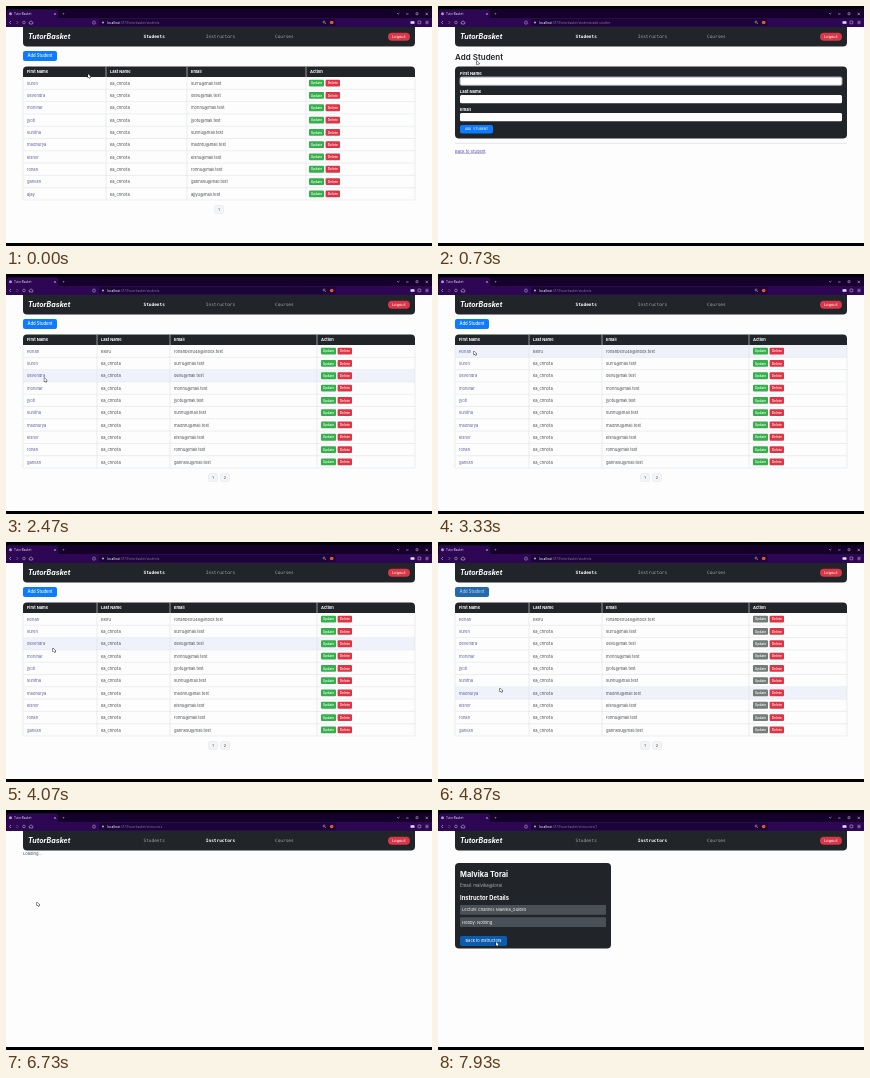
Animation of 426 by 240 pixels, one loop 8000 ms. Source, as an HTML page with a canvas:

```html
<!DOCTYPE html>
<html lang="en">
<head>
<meta charset="utf-8">
<title>Student admin</title>
<style>
html, body { margin: 0; width: 100%; height: 100%; overflow: hidden; background: #000; }
canvas { display: block; width: 426px; height: 240px; }
</style>
</head>
<body>
<canvas id="stage" width="426" height="240"></canvas>
<script>
const ctx = document.getElementById('stage').getContext('2d');
const LOOP = 8000;
const SANS = 'Inter, sans-serif', MONO = '"DejaVu Sans Mono", monospace';
const DARK = '#212529', BLUE = '#0d7bfd', RED = '#dc3545', GREEN = '#34b04a', LINE = '#dfe2e6';
const BRAND = 'TutorBasket';

const LAST = 'ka_chhota';
const people = [
  ['suren', 'surru'], ['devendra', 'devu'], ['mohinar', 'mohnu'], ['jyoti', 'jyotu'],
  ['sunitha', 'sunnu'], ['madhurya', 'madhru'], ['kishor', 'kishu'], ['rohan', 'rohnu'],
  ['ganesh', 'gannesu'], ['ajay', 'ajjyu']
].map(([name, mail]) => [name, LAST, mail + '@mail.test']);
const newcomer = ['Rohan', 'Belru', 'rohanbelru48@inbox.test'];

// Views in order: start time, kind
const views = [
  [0, 'list'], [600, 'form'], [2000, 'added'], [5980, 'list'], [6400, 'loading'], [6950, 'details']
];
// Pointer stops: time, x, y
const pointer = [
  [0, 82, 68], [350, 34, 50], [650, 34, 50], [950, 60, 76], [1200, 72, 88], [1530, 90, 104.5],
  [1750, 40, 123], [2050, 40, 123], [3000, 36, 77], [3560, 36, 77], [4700, 62, 146],
  [5000, 62, 146], [5550, 336, 77], [6000, 336, 77], [6300, 214, 30], [6420, 214, 30],
  [6720, 31, 92], [7000, 31, 92], [7700, 58, 132], [8000, 58, 132]
];

function rect(x, y, w, h, color, radius = 0) {
  ctx.fillStyle = color;
  ctx.beginPath();
  ctx.roundRect(x, y, w, h, radius);
  ctx.fill();
}

function outline(x, y, w, h, color, radius = 0, width = 0.5) {
  ctx.strokeStyle = color;
  ctx.lineWidth = width;
  ctx.beginPath();
  ctx.roundRect(x, y, w, h, radius);
  ctx.stroke();
}

function path(color, width, ...points) {
  ctx.strokeStyle = color;
  ctx.lineWidth = width;
  ctx.beginPath();
  points.forEach(([x, y], i) => i ? ctx.lineTo(x, y) : ctx.moveTo(x, y));
  ctx.stroke();
}

function dot(x, y, r, color) {
  ctx.fillStyle = color;
  ctx.beginPath();
  ctx.arc(x, y, r, 0, 2 * Math.PI);
  ctx.fill();
}

// Text is centred vertically on y
function text(str, x, y, size, color, { weight = 400, font = SANS, align = 'left' } = {}) {
  ctx.font = `${weight} ${size}px ${font}`;
  ctx.textAlign = align;
  ctx.textBaseline = 'alphabetic';
  ctx.fillStyle = color;
  ctx.fillText(str, x, y + size * 0.35);
  return ctx.measureText(str).width;
}

function button(label, x, y, w, h, color, size, { ink = '#fff', radius = 2, font = SANS, weight = 500 } = {}) {
  rect(x, y, w, h, color, radius);
  text(label, x + w / 2, y + h / 2, size, ink, { align: 'center', font, weight });
}

function pointerAt(t) {
  const i = pointer.findIndex(stop => stop[0] > t);
  const [t0, x0, y0] = pointer[i - 1], [t1, x1, y1] = pointer[i];
  const p = (t - t0) / (t1 - t0), k = p * p * (3 - 2 * p);
  return [x0 + (x1 - x0) * k, y0 + (y1 - y0) * k];
}

const inside = ([px, py], x, y, w, h) => px >= x && px < x + w && py >= y && py < y + h;

function drawBrowser(route) {
  rect(0, 0, 426, 240, '#000');
  rect(0, 3, 426, 9, '#14002a');
  rect(1, 3.5, 51, 9, '#2d0754', [2, 2, 0, 0]);
  rect(0, 12, 426, 9, '#2d0754');
  dot(4.5, 7.8, 1.5, '#a997c8');
  text(BRAND, 8, 7.8, 3.1, '#ded5ea');
  text('×', 47.5, 7.7, 4.5, '#ded5ea');
  text('+', 56, 7.7, 4.5, '#b9a9cf');

  const ink = '#c9bddb';
  path(ink, 0.6, [391, 7], [392.2, 8.2], [393.4, 7]);
  path(ink, 0.6, [400, 8], [402.5, 8]);
  outline(410, 6.7, 2, 2, ink);
  path(ink, 0.6, [419.5, 6.7], [422, 9.2]);
  path(ink, 0.6, [422, 6.7], [419.5, 9.2]);

  path(ink, 0.6, [5, 15], [3.5, 16.5], [5, 18]);
  path('#8f7aa9', 0.6, [10.5, 15], [12, 16.5], [10.5, 18]);
  outline(16.7, 15.2, 2.6, 2.6, ink, 1.3);
  path(ink, 0.6, [23, 16.5], [25, 14.8], [27, 16.5], [26.5, 18], [23.5, 18], [23, 16.5]);
  outline(86.8, 15.2, 2.4, 2.8, ink, 0.4);
  rect(93, 13, 237, 7, '#1b0438', 2);
  dot(97, 16.5, 0.9, ink);
  const host = text('localhost', 101, 16.5, 3.1, '#fff');
  text(':5173/tutorbasket/' + route, 101 + host, 16.5, 3.1, '#8975a3');
  outline(317, 15, 2, 2, ink, 1);
  path(ink, 0.5, [319, 17], [320, 18]);
  dot(325.7, 16.5, 1.8, '#f0522c');
  rect(404.5, 15.2, 4, 2.6, '#e9e2f1', 0.5);
  outline(412, 15, 2.8, 2.8, ink);
  for (const y of [15.3, 16.5, 17.7]) path(ink, 0.5, [419.5, y], [422.5, y]);

  rect(0, 21, 426, 216, '#fdfdfd');
}

function drawNav(active) {
  rect(17, 21, 392, 19.5, DARK, [0, 0, 4, 4]);
  text(BRAND, 22, 30.8, 7.1, '#fff', { weight: 'italic 700' });
  [['Students', 137.5], ['Instructors', 199.8], ['Courses', 269]].forEach(([label, x]) => {
    const on = label === active;
    text(label, x, 30.7, 4.45, on ? '#fff' : '#a2a6aa', { font: MONO, weight: on ? 700 : 400 });
  });
  button('Logout', 382, 26.7, 22, 8, RED, 3.9, { radius: 4, font: MONO });
}

function drawTable(added, mouse, settling) {
  const rows = added ? [newcomer, ...people.slice(0, 9)] : people;
  const cols = added ? [17, 91, 164, 311, 409] : [17, 100, 181, 300, 409];
  const top = 71, step = 12.3, bottom = top + 10 * step;
  const addHover = settling || inside(mouse, 17, 45, 34, 10);
  button('Add Student', 17, 45, 34, 10, addHover ? '#2468ad' : BLUE, 4.2, { ink: settling ? '#b7cce4' : '#fff' });

  rect(17, 60.5, 392, 10.5, DARK, [4, 4, 0, 0]);
  ['First Name', 'Last Name', 'Email', 'Action'].forEach((label, i) =>
    text(label, cols[i] + 4, 66, 4, '#fff', { weight: 700 }));

  rows.forEach((row, i) => {
    const y = top + i * step, mid = y + step / 2;
    if (inside(mouse, 17, y, 392, step)) rect(17, y, 392, step, '#f0f2fb');
    row.forEach((value, c) => text(value, cols[c] + 4, mid + 0.3, 4.1, c ? '#4b4e52' : '#5960a0'));
    const x = cols[3] + (added ? 4 : 3);
    const hot = inside(mouse, x + 16.6, mid - 3.5, 14.5, 7);
    button('Update', x, mid - 3.4, 15, 6.8, settling ? '#747c78' : GREEN, 3.3, { radius: 1 });
    button('Delete', x + 16.6, mid - 3.4, 14.4, 6.8, hot ? '#9d1c2a' : RED, 3.3, { radius: 1 });
    path(LINE, 0.6, [17, y + step], [409, y + step]);
  });
  cols.forEach((x, i) => {
    const edge = i === 0 || i === 4;
    path(LINE, 0.6, [x, edge ? top : 60.5], [x, bottom]);
  });

  (added ? [207, 219] : [213]).forEach((x, i) => {
    rect(x - 4.5, 199.5, 9, 8, '#f3f4f6', 2);
    outline(x - 4.5, 199.5, 9, 8, LINE, 2);
    text(i + 1, x, 203.5, 3.8, '#4b4e52', { align: 'center' });
  });
}

function drawForm(t, mouse) {
  const filled = t >= 1200;
  text('Add Student', 17, 51, 8, DARK, { weight: 600 });
  rect(17, 60.5, 392, 72, DARK, 4);
  ['First Name', 'Last Name', 'Email'].forEach((label, i) => {
    const y = 71 + i * 18;
    text(label, 22, y - 3.4, 4.1, '#fff', { weight: 700 });
    rect(22, y, 382, 8.3, filled ? '#e8f0fe' : '#fff', 1.5);
    if (i === 0) outline(22, y, 382, 8.3, '#9ea6b1', 1.5, 1);
    if (filled) text(newcomer[i], 24, y + 4.2, 3.4, '#333');
  });
  const hot = inside(mouse, 22, 119, 33, 8.5);
  button('ADD STUDENT', 22, 119, 33, 8.5, hot ? '#0b5ed7' : BLUE, 3.5, { font: MONO });
  path('#d3d6d9', 0.6, [17, 137.3], [409, 137.3]);
  const w = text('Back to Student', 17, 145.2, 4.1, '#5348a8');
  path('#5348a8', 0.4, [17, 147.4], [17 + w, 147.4]);
}

function drawDetails(mouse) {
  rect(17, 53, 156, 85.5, DARK, 4);
  text('Malvika Torai', 22, 64, 7.4, '#fff', { weight: 700 });
  text('Email: malvika@torai', 22, 75.6, 4.3, '#adb1b5');
  text('Instructor Details', 22, 88, 5.8, '#fff', { weight: 700 });
  ['Lecture Channel: Malvika_Guides', 'Hobby: Nothing'].forEach((line, i) => {
    rect(22, 95 + i * 12.2, 146, 9.8, '#495057', 1);
    text(line, 24, 99.9 + i * 12.2, 4.1, '#f1f3f5');
  });
  const hot = inside(mouse, 22, 126, 47, 10);
  button('Back to Instructors', 22, 126, 47, 10, hot ? '#0b5cad' : BLUE, 4, { ink: '#e2ecf8' });
}

function drawPointer([x, y]) {
  ctx.save();
  ctx.translate(x, y);
  ctx.beginPath();
  [[0, 0], [0, 3.8], [0.9, 3], [1.6, 4.3], [2.2, 4], [1.6, 2.8], [2.8, 2.7]]
    .forEach(p => ctx.lineTo(...p));
  ctx.closePath();
  ctx.lineWidth = 0.9;
  ctx.strokeStyle = '#111';
  ctx.stroke();
  ctx.fillStyle = '#fff';
  ctx.fill();
  ctx.restore();
}

function draw(t) {
  const view = views.findLast(([start]) => t >= start)[1];
  const mouse = pointerAt(t);
  const teaching = view === 'loading' || view === 'details';
  const routes = {
    form: 'students/add-student', loading: 'instructors', details: 'instructors/1'
  };
  drawBrowser(routes[view] || 'students');
  drawNav(teaching ? 'Instructors' : 'Students');
  if (view === 'form') drawForm(t, mouse);
  else if (view === 'loading') text('Loading...', 17, 43.2, 4.1, '#4b4e52');
  else if (view === 'details') drawDetails(mouse);
  else drawTable(view === 'added', mouse, t >= 4800 && t < 4940);
  drawPointer(mouse);
}

function tick() {
  draw(performance.now() % LOOP);
  requestAnimationFrame(tick);
}
tick();
</script>
</body>
</html>
```
